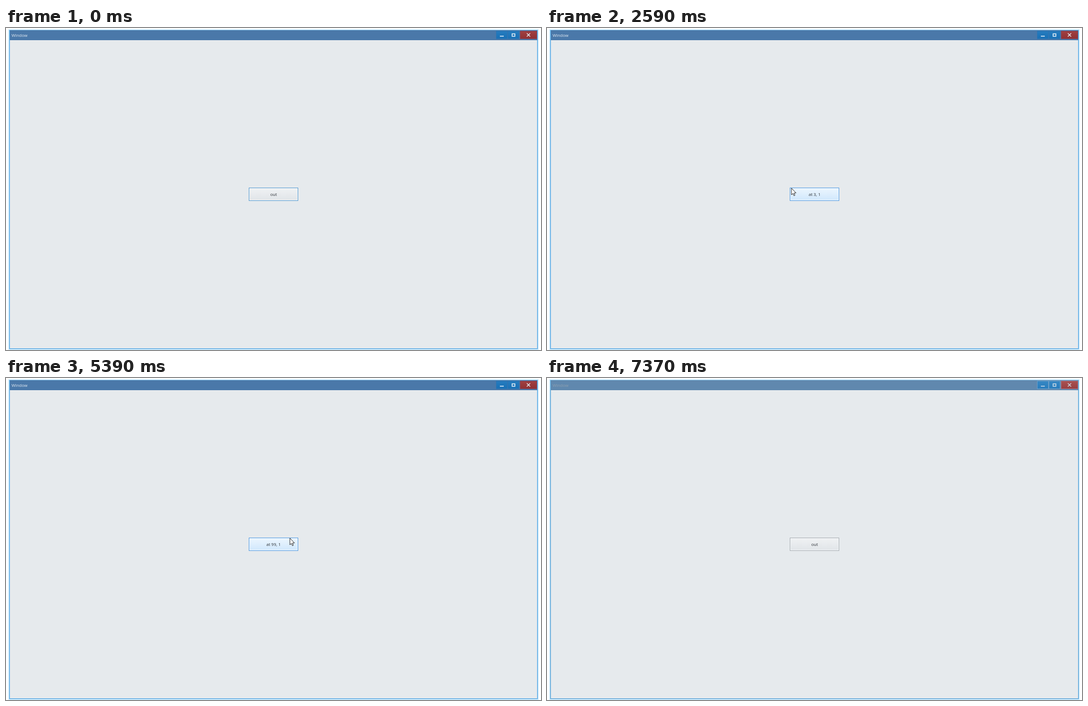
An HTML page with a canvas that plays this animation: 963 px wide and 581 px high, repeating every 7.45 s.

```html
<!DOCTYPE html>
<html lang="en">
<head>
<meta charset="utf-8">
<title>Pointer over a button</title>
<style>
  html, body { margin: 0; width: 100%; height: 100%; overflow: hidden; background: #fff; }
  canvas { display: block; width: 963px; height: 581px; }
</style>
</head>
<body>
<canvas id="stage" width="963" height="581"></canvas>
<script>
const ctx = document.getElementById('stage').getContext('2d');
const LOOP = 7450, TICK = 79;
const BUTTON = { x: 437, y: 288, w: 89, h: 24 };
const LEAVE = { at: 5700, fade: 550 };

const mix = (a, b, k) => a + (b - a) * k;
const rgb = (a, b, k) => `rgb(${a.map((v, i) => Math.round(mix(v, b[i], k)))})`;

const linear = k => k;
const smooth = k => k * k * (3 - 2 * k);
const speedUp = power => k => k ** power;
const slowDown = power => k => 1 - (1 - k) ** power;

// Each glide carries the pointer from the last resting place to a new one.
const glides = [];
let rest = { x: 790, y: 446 };
function glide(start, end, x, y, ease = linear) {
  const to = { x, y };
  glides.push({ start, steps: Math.round((end - start) / TICK) + 1, end, from: rest, to, ease });
  rest = to;
}
glide(480, 940, 528, 311, slowDown(1.65));
glide(1180, 1890, 440, 289, slowDown(1.65));
glide(2280, 2280, 438.5, 289);
glide(2590, 3300, 505.6, 304, smooth);
glide(3380, 4040, 523, 306);
glide(4130, 4130, 525, 306);
glide(4370, 4370, 525, 307);
glide(4520, 4990, 440, 295, speedUp(2.55));
glide(5070, 5470, 517, 289, smooth);
glide(5700, 6250, 548, 451, slowDown(1.4));
glide(6410, 6580, 866, 544);
glide(6820, 6980, 912, 592);

function pointerAt(t) {
  const g = glides.filter(g => t >= g.start).pop();
  if (!g) return null;
  const pace = (g.end - g.start) / (g.steps - 1) || TICK;
  const step = Math.min(g.steps, 1 + Math.floor((t - g.start + 8) / pace));
  const place = k => ({
    x: mix(g.from.x, g.to.x, g.ease(k)),
    y: mix(g.from.y, g.to.y, g.ease(k))
  });
  const { x, y } = place(step / g.steps);
  // While moving, the label trails the pointer slightly.
  const seen = place(step < g.steps ? step / g.steps - 0.012 : 1);
  const inside = x >= 437.5 && x < 525.5 && y >= 288 && y < 311 ;
  const label = `at ${Math.floor((seen.x - 437.5) * 1.36)}, ${Math.floor((seen.y - 288.2) * 1.37)}`;
  return { x: Math.round(x), y: Math.round(y), inside, label };
}

function fill(color, x, y, w, h) {
  ctx.fillStyle = color;
  ctx.fillRect(x, y, w, h);
}

function outline(color, x, y, w, h) {
  ctx.strokeStyle = color;
  ctx.lineWidth = 1;
  ctx.strokeRect(x + 0.5, y + 0.5, w - 1, h - 1);
}

function gradient(x, y, w, h, top, bottom) {
  const g = ctx.createLinearGradient(0, y, 0, y + h);
  g.addColorStop(0, top);
  g.addColorStop(1, bottom);
  fill(g, x, y, w, h);
}

function text(str, x, y, color, align) {
  ctx.font = '7.6px "Open Sans", "Noto Sans", sans-serif';
  ctx.textAlign = align;
  ctx.fillStyle = color;
  ctx.fillText(str, x, y);
}

function drawCaptionButton(x, w, top, bottom, edge) {
  gradient(x, 5, w, 15, top, bottom);
  outline(edge, x, 5, w, 15);
}

function drawIcons(color) {
  fill(color, 889, 14, 7, 1.4);
  ctx.strokeStyle = color;
  ctx.lineWidth = 1.4;
  ctx.strokeRect(911, 10.5, 5, 4.5);
  ctx.lineWidth = 1.1;
  ctx.beginPath();
  for (const side of [-3, 3]) {
    ctx.moveTo(940.5 - side, 9.5);
    ctx.lineTo(940.5 + side, 15.5);
  }
  ctx.stroke();
}

function drawWindow(dim) {
  fill('#fff', 0, 0, 963, 581);
  outline('#e4f4fd', 4, 2, 955, 579);
  outline('#a5d9f8', 5, 3, 953, 577);
  outline(rgb([84, 164, 224], [88, 158, 208], dim), 6, 4, 951, 575);
  fill('#e6eaed', 7, 22, 949, 556);
  fill(rgb([74, 120, 169], [96, 136, 174], dim), 7, 4, 949, 18);
  text('Window', 10, 16, rgb([225, 233, 241], [142, 160, 176], dim), 'left');

  const blueTop = rgb([38, 124, 190], [54, 136, 196], dim);
  const blueBottom = rgb([24, 112, 182], [40, 124, 188], dim);
  const blueEdge = rgb([46, 116, 178], [104, 156, 198], dim);
  drawCaptionButton(882, 21, blueTop, blueBottom, blueEdge);
  drawCaptionButton(903, 21, blueTop, blueBottom, blueEdge);
  drawCaptionButton(925, 31, rgb([160, 64, 66], [170, 82, 82], dim),
    rgb([144, 48, 50], [152, 62, 64], dim), rgb([124, 72, 96], [166, 112, 126], dim));
  drawIcons(rgb([235, 242, 248], [205, 218, 230], dim));
}

function drawButton(label, hover, dim) {
  const { x, y, w, h } = BUTTON;
  gradient(x, y, w, h,
    rgb([240, 242, 244], [237, 246, 254], hover),
    rgb([224, 228, 232], [207, 231, 252], hover));
  outline(rgb([242, 245, 247], [240, 248, 255], hover), x + 1, y + 1, w - 2, h - 2);
  const border = rgb([96, 160, 210], [92, 160, 226], hover);
  outline(dim ? rgb([96, 160, 210], [172, 177, 182], dim) : border, x, y, w, h);
  text(label, 481.6, 302.5, '#2b3036', 'center');
}

function drawPointer({ x, y }) {
  const shape = [[0, 0], [0, 12], [2.7, 9.5], [4.5, 13.6], [6.3, 12.8], [4.6, 8.9], [8.2, 8.6]];
  ctx.beginPath();
  for (const [dx, dy] of shape) ctx.lineTo(x + dx, y + dy);
  ctx.closePath();
  ctx.fillStyle = '#fff';
  ctx.fill();
  ctx.strokeStyle = '#1c1c1c';
  ctx.lineWidth = 0.9;
  ctx.stroke();
}

function hoverAt(t, inside) {
  if (inside) return 1;
  if (t < LEAVE.at) return 0;
  return 1 - Math.min(1, (t - LEAVE.at) / LEAVE.fade) ** 2;
}

function draw(t) {
  const pointer = pointerAt(t);
  const inside = pointer !== null && pointer.inside;
  const dim = t >= 7370 ? 1 : t >= 7290 ? 0.5 : 0;
  drawWindow(dim);
  drawButton(inside ? pointer.label : 'out', hoverAt(t, inside), dim);
  if (pointer) drawPointer(pointer);
}

const began = performance.now();
function tick() {
  draw((performance.now() - began) % LOOP);
  requestAnimationFrame(tick);
}
tick();
</script>
</body>
</html>
```
